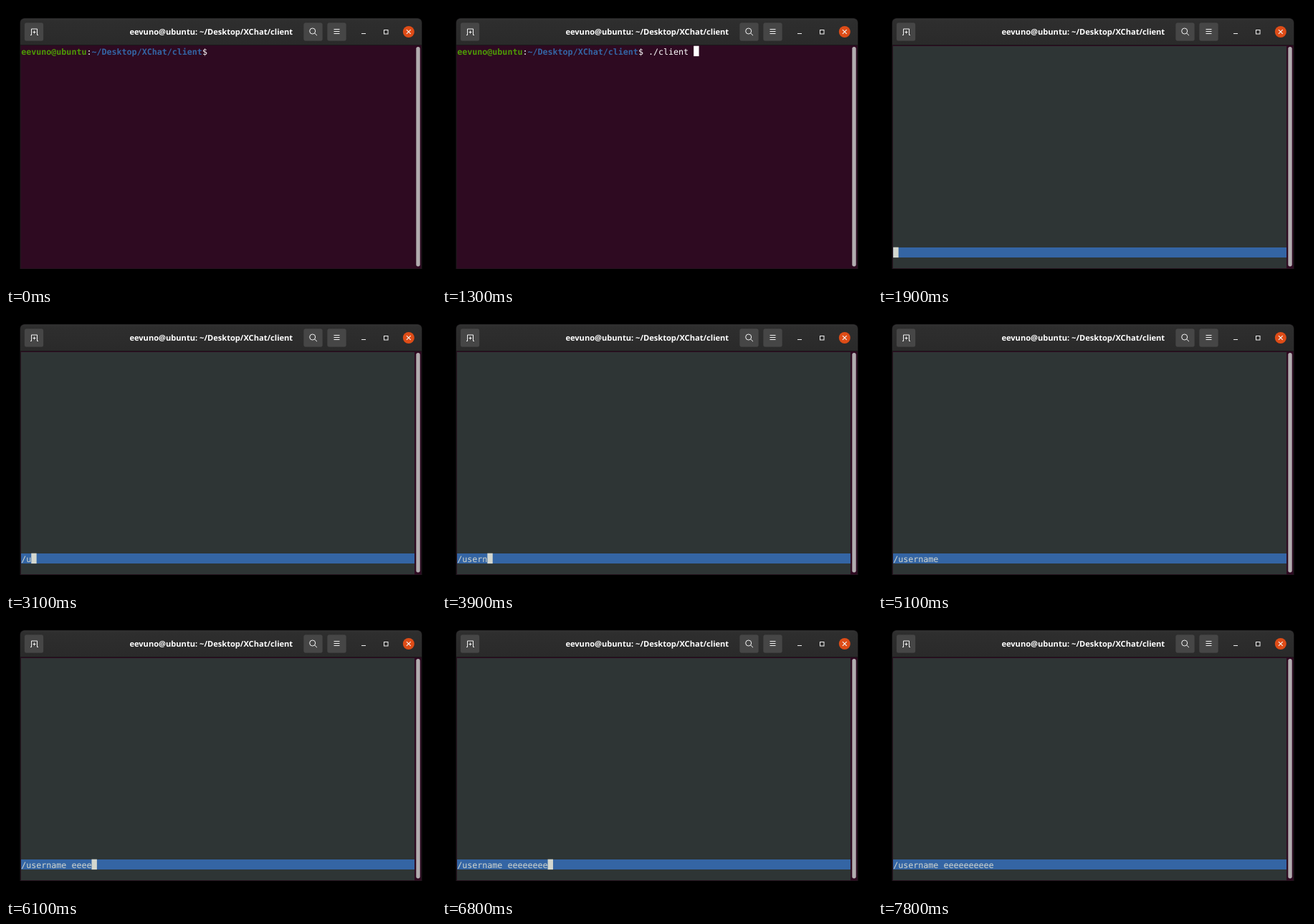
An HTML page with a canvas that plays this animation: 600 by 388 pixels, repeating every 8 s.

```html
<!DOCTYPE html>
<html lang="en">
<head>
<meta charset="utf-8">
<title>Terminal chat client</title>
<style>
html, body { margin: 0; width: 100%; height: 100%; overflow: hidden; background: #000; }
canvas { display: block; }
</style>
</head>
<body>
<canvas id="stage" width="600" height="388"></canvas>
<script>
const ctx = document.getElementById('stage').getContext('2d');
const LOOP = 8000, WAKE = 500, ENTER = 1800, BLINK = 600, TICK = 100;
const LEFT = 21.2, TOP = 56, CELL_W = 7.02, CELL_H = 14.05, BASE = 11.8;
const MONO = '11.66px "DejaVu Sans Mono", monospace';
const USER = 'eevuno@ubuntu', DIR = '~/Desktop/XChat/client';
const INPUT_ROW = 20;
const ICON = '#f2f2f2';

const keys = [];

// Queues key presses at an even pace, shown on the next screen refresh.
function type(text, at, gap = 0) {
  [...text].forEach((char, i) =>
    keys.push({ char, at: Math.round((at + i * gap) / TICK) * TICK }));
}

type('./', 900);
type('c', 1100);
type('lient ', 1300);
type('\n', ENTER);
type('/', 2700);
type('usern', 3100, 200);
type('ame', 4000, 100);
type(' ', 4500);
type('e'.repeat(10), 5600, 175);

function rect(x, y, w, h, color) {
  ctx.fillStyle = color;
  ctx.fillRect(x, y, w, h);
}

function round(x, y, w, h, r, color) {
  ctx.beginPath();
  ctx.roundRect(x, y, w, h, r);
  ctx.fillStyle = color;
  ctx.fill();
}

function line(points, width = 1) {
  ctx.beginPath();
  for (const [x, y] of points) ctx.lineTo(x, y);
  ctx.strokeStyle = ICON;
  ctx.lineWidth = width;
  ctx.stroke();
}

// Prints at a column and returns the column after the text.
function print(text, col, row, color, bold) {
  ctx.font = (bold ? 'bold ' : '') + MONO;
  ctx.textAlign = 'left';
  ctx.fillStyle = color;
  ctx.fillText(text, LEFT + col * CELL_W, TOP + row * CELL_H + BASE);
  return col + text.length;
}

function cursor(col, row, color) {
  rect(LEFT + col * CELL_W, TOP + row * CELL_H - 0.3, 7.4, 14.4, color);
}

function headerButton(x) {
  round(x, 23, 27, 26, 3, '#333');
  round(x + 0.5, 23.5, 26, 25, 2.5, '#464646');
}

function drawIcons() {
  [25.5, 415, 448].forEach(headerButton);

  // New tab
  line([[34, 40.5], [35.5, 40.5], [35.5, 32], [43.5, 32], [43.5, 40.5], [45, 40.5]]);
  line([[37.5, 36.5], [41.5, 36.5]]);
  line([[39.5, 34.5], [39.5, 38.5]]);

  // Search
  ctx.beginPath();
  ctx.arc(427.7, 35, 4, 0, Math.PI * 2);
  ctx.stroke();
  line([[430.5, 37.8], [434, 41.2]]);

  // Menu
  for (let y = 32.5; y < 40; y += 3) line([[457.5, y], [465.5, y]]);

  // Minimise, maximise, close
  line([[496, 38.5], [502, 38.5]]);
  ctx.strokeRect(527.5, 33.5, 5.5, 5.5);
  ctx.beginPath();
  ctx.arc(561.8, 36, 8, 0, Math.PI * 2);
  ctx.fillStyle = '#de4c17';
  ctx.fill();
  line([[558.9, 33.1], [564.7, 38.9]], 1.2);
  line([[564.7, 33.1], [558.9, 38.9]], 1.2);
}

function drawWindow() {
  rect(0, 0, 600, 388, '#000');
  round(19.5, 17, 561, 350, [6, 6, 0, 0], '#1d1a1c');
  const shade = ctx.createLinearGradient(0, 17, 0, 54);
  shade.addColorStop(0, '#343434');
  shade.addColorStop(0.1, '#2e2e2e');
  shade.addColorStop(1, '#2a2a2a');
  round(20, 17.5, 560, 37, [6, 6, 0, 0], shade);
  rect(20, 54, 560, 1, '#1b171a');
  rect(20.5, 55, 559, 311.5, '#2e0a21');

  ctx.font = 'bold 11.1px "Open Sans", "Noto Sans", sans-serif';
  ctx.textAlign = 'center';
  ctx.fillStyle = '#fff';
  ctx.fillText(USER + ': ' + DIR, 286.3, 40);
  drawIcons();
}

function drawShell(command, showCursor) {
  let col = print(USER, 0, 0, '#4e9a06', true);
  col = print(':', col, 0, '#fff');
  col = print(DIR, col, 0, '#3465a4', true);
  col = print('$ ' + command, col, 0, '#fff');
  if (showCursor) cursor(col, 0, '#fff');
}

function drawChat(message, showCursor) {
  rect(21, 56, 549, 310, '#2e3535');
  rect(21, 337, 549, 14, '#3465a4');
  const col = print(message, 0, INPUT_ROW, '#d3d7cf');
  if (showCursor) cursor(col, INPUT_ROW, '#d3d7cf');
}

function draw(t) {
  const pressed = keys.filter(key => key.at <= t);
  const [command, message = ''] = pressed.map(key => key.char).join('').split('\n');
  const lastKey = pressed.length ? pressed[pressed.length - 1].at : WAKE;
  // The cursor goes dark a moment after the last key press.
  const showCursor = t >= WAKE && t - lastKey < BLINK;

  drawWindow();
  if (t < ENTER + TICK) drawShell(command, showCursor);
  else drawChat(message, showCursor);
  round(572.3, 57, 5.4, 306.5, 2.7, '#b2adb0');
}

ctx.textRendering = 'geometricPrecision';
const start = performance.now();
function frame() {
  draw((performance.now() - start) % LOOP);
  requestAnimationFrame(frame);
}
frame();
</script>
</body>
</html>
```
